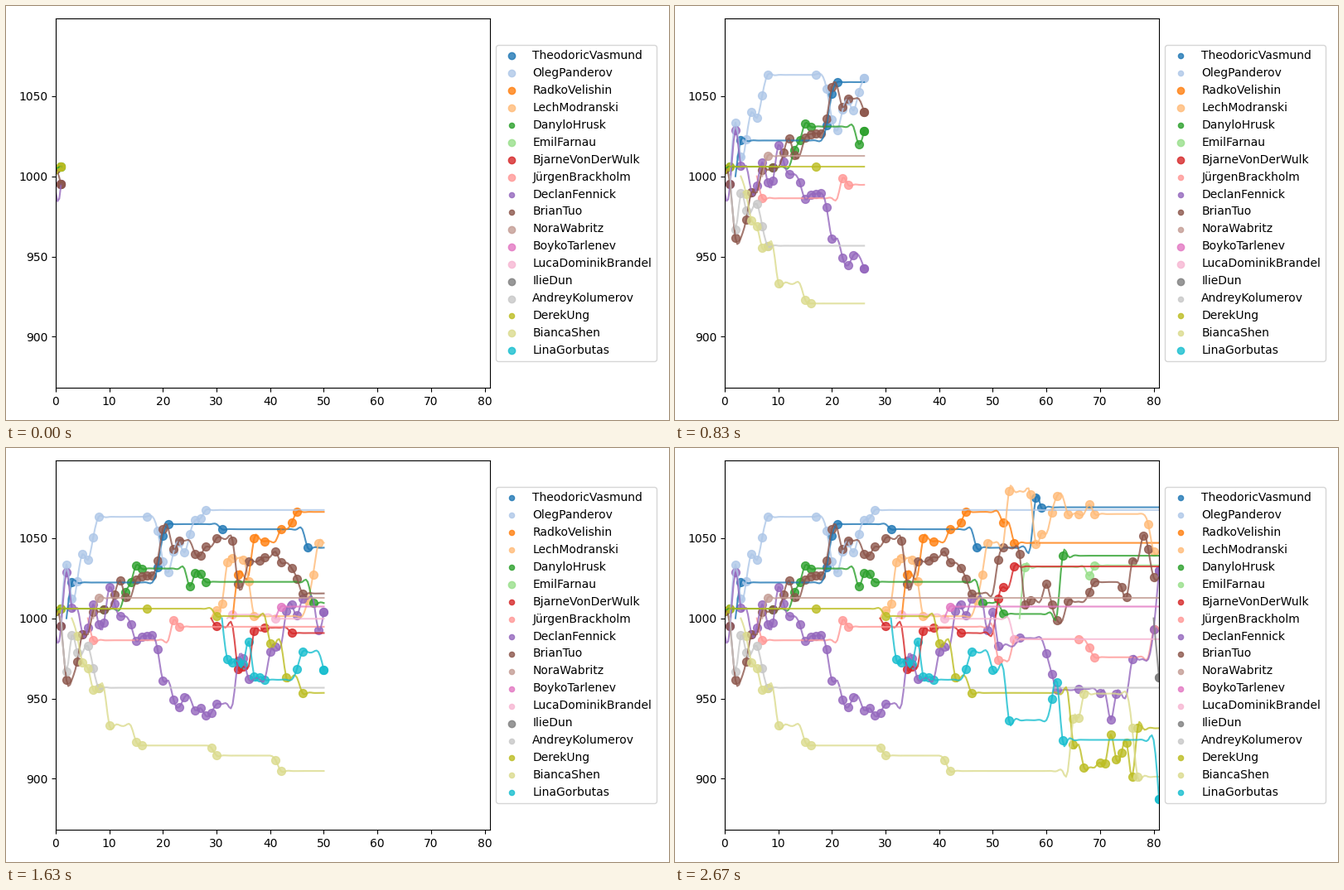
A matplotlib script for the animation above (5.71 s loop, 800 by 500 pixels).

```python
import matplotlib.pyplot as plt
import numpy as np
from matplotlib.animation import FuncAnimation

LOOP_MS = 5710
FRAMES = 172
LAST_ROUND = 81
SAMPLES_PER_ROUND = 3
ALPHA = 0.8
WAITING_SIZE, ACTIVE_SIZE = 36, 20

plt.rcParams["font.family"] = "DejaVu Sans"
fig = plt.figure(figsize=(8, 5), dpi=100)
ax = fig.add_axes([0.075, 0.078, 0.655, 0.892])
ax.set_xlim(0, LAST_ROUND)
ax.set_ylim(868.2, 1098.4)
ax.set_xticks(range(0, 81, 10))
ax.set_yticks(range(900, 1051, 50))

players = []


def add_player(name, ratings):
    """Register a player; the first entry is the unmarked starting rating."""
    color = plt.cm.tab20(len(players) / 18)
    line, = ax.plot([], [], color=color, alpha=ALPHA, lw=1.5)
    dots = ax.scatter([], [], s=50, color=color, alpha=ALPHA, label=name)
    games = [(x, y) for x, y in list(ratings.items())[1:] if x == int(x)]
    players.append((ratings, np.array(games, float), line, dots))


def spline(x, y, xs):
    """Natural cubic spline through (x, y), evaluated at xs."""
    n = len(x)
    h = np.diff(x)
    slope = np.diff(y) / h
    system, rhs = np.eye(n), np.zeros(n)
    for i in range(1, n - 1):
        system[i, i - 1:i + 2] = h[i - 1], 2 * (h[i - 1] + h[i]), h[i]
        rhs[i] = 6 * (slope[i] - slope[i - 1])
    m = np.linalg.solve(system, rhs)
    i = np.clip(np.searchsorted(x, xs, side="right") - 1, 0, n - 2)
    t = xs - x[i]
    tilt = slope[i] - h[i] * (2 * m[i] + m[i + 1]) / 6
    return y[i] + t * (tilt + t * (m[i] / 2 + t * (m[i + 1] - m[i]) / (6 * h[i])))


def rating_curve(ratings, now):
    """Hold each rating until the next game, then smooth the steps."""
    start = min(ratings)
    if now <= start:
        return [], []
    x = sorted(set(range(start, now + 1)) | {k for k in ratings if k <= now})
    y, held = [], 1000
    for k in x:
        held = ratings.get(k, held)
        y.append(held)
    xs = np.linspace(start, now, (now - start) * SAMPLES_PER_ROUND + 1)
    return xs, spline(np.array(x, float), np.array(y, float), xs)


add_player("TheodoricVasmund", {
    2: 1000, 3: 1022.3, 19: 1032, 20: 1051.5, 21: 1058.7, 31: 1055.5,
    47: 1044, 58: 1075, 59: 1069.2})
add_player("OlegPanderov", {
    1: 1000, 2: 1033.5, 3: 1012, 4: 1023, 5: 1040, 6: 1036.3, 7: 1050.5,
    8: 1063.2, 17: 1063.5, 19: 1054.7, 20: 1035.5, 21: 1028.7, 22: 1041.5,
    23: 1047.5, 24: 1041, 25: 1052.3, 26: 1061, 27: 1062.3, 28: 1067.5})
add_player("RadkoVelishin", {
    33: 1000, 34: 1027, 37: 1049.7, 39: 1048, 42: 1055.5, 44: 1059.5,
    45: 1066.3, 52: 1059.5, 54: 1047})
add_player("LechModranski", {
    29: 1000, 30: 1005, 31: 1009, 32: 1035, 33: 1037.5, 35: 1036.5, 36: 1023,
    37: 1001.3, 47: 1011, 48: 1027, 49: 1047, 53: 1079.3, 57: 1077,
    58: 1046.5, 59: 1052.7, 61: 1066, 62: 1076.3, 64: 1065, 66: 1065,
    68: 1071, 69: 1065, 79: 1058.5, 80: 1041.5})
add_player("DanyloHrusk", {
    -1: 1000, 0: 1004.5, 1: 1006, 9: 1005.7, 13: 1016.5, 14: 1022.3,
    15: 1033, 16: 1031, 25: 1020, 26: 1028.3, 27: 1027.5, 28: 1022.7,
    48: 1009.5, 52: 1002.7, 63: 1039})
add_player("EmilFarnau", {55: 1000, 56: 1032, 68: 1026.5, 69: 1033})
add_player("BjarneVonDerWulk", {
    29: 1000, 30: 995, 34: 968.5, 35: 970, 37: 992.3, 39: 994.2, 44: 990.8,
    51: 1012, 52: 1019.5, 54: 1032.3})
add_player("JürgenBrackholm", {
    6: 1000, 7: 986.3, 22: 999, 23: 994.7, 51: 974, 54: 987, 66: 987,
    68: 981.5, 69: 975.7, 80: 993})
add_player("DeclanFennick", {
    0: 990, 0.5: 984, 1: 995, 2: 1028.5, 3: 1006.5, 5: 990, 6: 994.3,
    7: 1008.7, 8: 996.3, 9: 997, 10: 1019.5, 11: 1009, 12: 1001.3, 14: 996,
    15: 985.7, 16: 988.6, 17: 989, 18: 989.5, 19: 980.5, 20: 961.2, 22: 949,
    23: 944.5, 24: 950.7, 26: 942.7, 27: 944, 28: 939.2, 29: 941, 30: 946.5,
    34: 973.5, 35: 975, 36: 962, 40: 979, 41: 982.5, 43: 1004.5, 44: 1008.5,
    45: 1002, 46: 1012, 49: 992.7, 50: 1003.7, 51: 983, 55: 987.7, 60: 978,
    61: 965.3, 62: 955.3, 66: 956, 70: 953.3, 72: 936.7, 73: 952.7,
    76: 974.5, 80: 993, 81: 1030})
add_player("BrianTuo", {
    -1: 1000, 0: 1004.5, 1: 995, 2: 961.5, 4: 973, 5: 990, 7: 1004,
    9: 1005.5, 11: 1015, 12: 1023.5, 13: 1013, 15: 1024, 16: 1026.3,
    17: 1026.8, 18: 1026.7, 19: 1036, 20: 1055.8, 22: 1043, 23: 1048.3,
    26: 1040.3, 27: 1039.3, 28: 1044.6, 30: 1050, 33: 1048.4, 34: 1021.5,
    36: 1035.4, 38: 1036.2, 39: 1038.2, 41: 1041.5, 42: 1034.7, 44: 1031.2,
    45: 1024.8, 46: 1015.5, 51: 1036.5, 52: 1044, 55: 1040, 56: 1008.5,
    57: 1011.4, 60: 1021.3, 61: 1008.5, 62: 998.7, 64: 1010.4, 68: 1016.2,
    69: 1022.6, 74: 1019.2, 75: 1013.3, 76: 1035.6, 78: 1051.5, 79: 1043,
    80: 1025.5})
add_player("NoraWabritz", {7: 1000, 8: 1012.7})
add_player("BoykoTarlenev", {41: 1000, 42: 1007.3})
add_player("LucaDominikBrandel", {32: 1000, 33: 1002.3, 41: 999.7, 54: 987})
add_player("IlieDun", {80: 1000, 81: 963})
add_player("AndreyKolumerov", {
    1: 1000, 2: 967, 3: 989.3, 4: 978.5, 6: 982.7, 7: 969, 8: 956.7})
add_player("DerekUng", {
    0: 1001, 1: 1006, 17: 1006, 30: 1001.3, 40: 984.5, 43: 963, 46: 953.5,
    65: 921.3, 67: 907, 70: 910, 71: 909.7, 72: 927.5, 73: 912.3, 74: 916,
    75: 922.3, 76: 901, 77: 931.5})
add_player("BiancaShen", {
    3: 1000, 4: 989, 5: 972.5, 6: 968.8, 7: 955.2, 8: 956.7, 10: 933.2,
    15: 923, 16: 920.7, 29: 919.3, 30: 914.4, 41: 911.7, 42: 904.8,
    65: 937.6, 66: 938, 67: 953, 76: 931.5, 77: 901.2})
add_player("LinaGorbutas", {
    31: 1000, 32: 974.3, 33: 972.5, 34: 973, 35: 971.5, 36: 985.5, 37: 963.7,
    38: 963.3, 39: 961.7, 45: 968.5, 46: 979, 50: 968, 53: 936.5, 61: 949.7,
    62: 960, 63: 924.2, 81: 887.3})

legend = ax.legend(loc="center left", bbox_to_anchor=(1, 0.5))


def update(frame):
    now = min(frame + 1, LAST_ROUND)
    for (ratings, games, line, dots), key in zip(players, legend.legend_handles):
        line.set_data(*rating_curve(ratings, now))
        played = games[games[:, 0] <= now]
        # Games of the current round are drawn twice, so they look denser.
        latest = games[games[:, 0] == now]
        dots.set_offsets(np.vstack([played, latest]))
        key.set_sizes([ACTIVE_SIZE if len(played) else WAITING_SIZE], fig.dpi)


anim = FuncAnimation(fig, update, frames=FRAMES, interval=LOOP_MS / FRAMES,
                     repeat=True, repeat_delay=0, blit=False)
plt.show()
```
